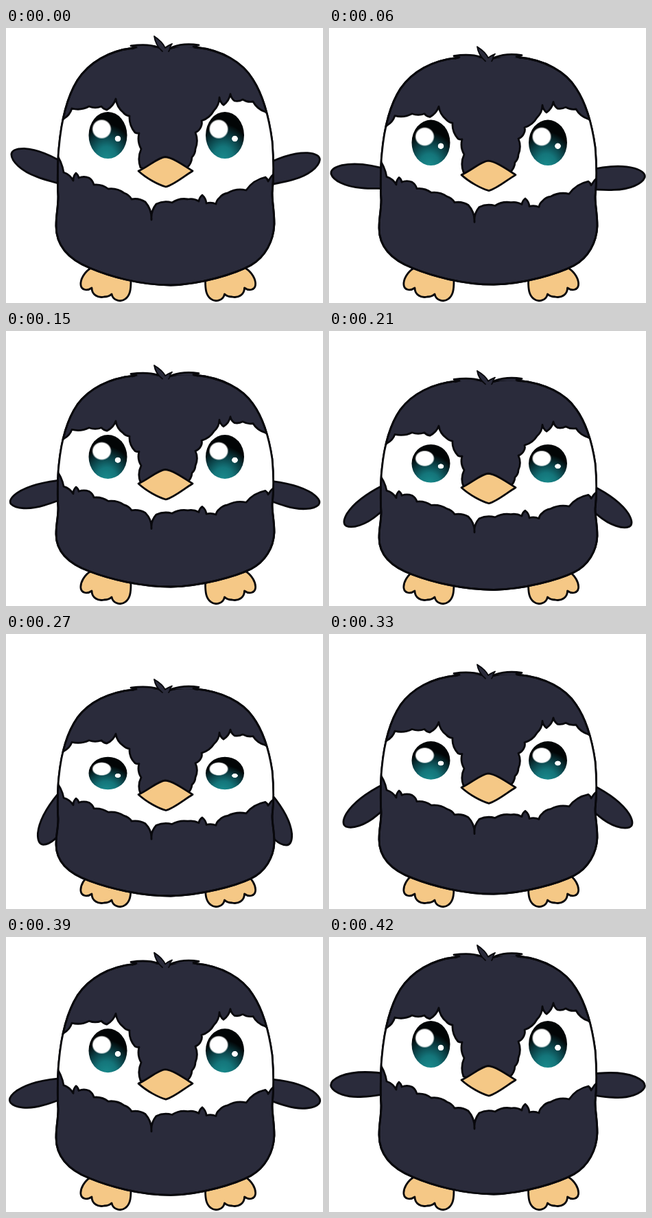
An HTML page that plays this animation: 462 px wide and 400 px high, repeating every 0.45 s.

```html
<!DOCTYPE html>
<html lang="en">
<head>
<meta charset="utf-8">
<title>Flapping penguin</title>
<style>
  html, body { margin: 0; width: 100%; height: 100%; overflow: hidden; background: #fff; }
  svg { display: block; }
  path { stroke: #08080c; stroke-width: 2.8; stroke-linejoin: round; stroke-linecap: round; vector-effect: non-scaling-stroke; }
  .dark { fill: #2a2b3b; }
  .orange { fill: #f5c886; }
  .line { fill: none; }
</style>
</head>
<body>
<svg width="462" height="400" viewBox="0 0 462 400">
  <defs>
    <radialGradient id="iris" cx=".46" cy="1" r=".86">
      <stop offset="0" stop-color="#19898b"/>
      <stop offset=".3" stop-color="#14757a"/>
      <stop offset=".6" stop-color="#0a3c42"/>
      <stop offset=".86" stop-color="#020506"/>
    </radialGradient>
    <radialGradient id="shine">
      <stop offset=".84" stop-color="#fff"/>
      <stop offset="1" stop-color="#fff" stop-opacity="0"/>
    </radialGradient>
    <path id="outline" d="M186 29C150 33 121 50 104 76C88 102 80 140 77 175C75 195 75 230 76 245C76 262 73 270 73 288C73 320 95 338 122 349C150 361 195 374 240 374C285 373 335 357 357 345C378 333 390 310 391 285C391 265 388 255 388 240C390 220 390 190 388 165C384 135 376 100 360 75C345 50 315 32 276 28C260 25 250 26 238 30L222 28C208 25 197 26 186 29Z"/>
    <clipPath id="inside"><use href="#outline"/></clipPath>
    <path id="wing" class="dark" d="M4 -12C-20 -17 -48 -19 -68 -12C-78 -8 -84 -3 -82 3C-78 12 -60 20 -36 19C-20 19 -8 16 4 16Z"/>
    <path id="foot" class="orange" d="M124 349C114 355 108 366 109 374C110 381 118 383 125 378C125 388 134 393 143 391C148 391 152 389 154 387C156 397 168 399 174 394C181 389 182 380 182 368L170 340Z"/>
    <g id="eye">
      <ellipse rx="28" ry="34" fill="url(#iris)"/>
      <circle cx="-9" cy="-9" r="14.5" fill="url(#shine)"/>
      <circle cx="14.5" cy="5" r="4.7" fill="url(#shine)"/>
    </g>
  </defs>

  <use href="#foot"/>
  <use href="#foot" transform="matrix(-1 0 0 1 472.5 0)"/>

  <g id="body">
    <use id="leftWing" href="#wing"/>
    <use id="rightWing" href="#wing"/>
    <use href="#outline" class="dark"/>
    <path id="mask" fill="#fff" clip-path="url(#inside)"/>
    <use href="#outline" class="line"/>
    <path class="dark" d="M222 28C208 23 195 24 182 26L190 28L184 30"/>
    <path class="dark" d="M242 28C255 23 270 23 281 25L273 27L279 29"/>
    <path class="dark" d="M228 34C221 28 217 20 216 12C222 16 229 22 232 29C235 26 238 25 242 23C238 27 240 31 237 34" style="stroke-width:1.8"/>
  </g>

  <use id="leftEye" href="#eye"/>
  <use id="rightEye" href="#eye"/>
  <path id="beak" class="orange" d="M193 208C207 202 222 188 232 187.5C242 188 258 199 272 208C260 215 245 228 233 231C222 228 205 219 193 208Z"/>
</svg>

<script>
const LOOP = 450, STEP = 30;
const place = (id, transform) => document.getElementById(id).setAttribute("transform", transform);

// Closed edge of small scallops that bulge inwards between the given tips
function ragged(text) {
  const tips = text.trim().split(/\s+/).map(s => s.split(",").map(Number));
  return "M" + tips[0] + tips.map(([x, y], i) => {
    const [u, v] = tips[(i + 1) % tips.length];
    return `Q${(x + u) / 2 - (v - y) * .2} ${(y + v) / 2 + (u - x) * .2} ${u} ${v}`;
  }).join("") + "Z";
}

const brow = `60,150 84,132 96,117 121,114 139,114 147,119 160,103 171,123 180,128 188,152 194,153
  197,176 196,203 264,203 271,188 276,176 276,152 284,144 285,135 303,120 311,101 317,112 327,96
  333,106 345,104 360,107 378,122 410,135`;
const chest = `410,200 382,223 378,217 350,236 323,240 311,247 306,256 292,255 286,243 281,252 265,249
  242,254 219,256 212,279 203,253 183,249 172,240 149,234 128,228 121,218 106,218 102,211 98,222
  84,210 60,170`;
document.getElementById("mask").setAttribute("d", ragged(brow + " " + chest));

// Raised, halfway down, crouched, risen again
const poses = [
  { time: 0,   top: 12, height: 362, drop: 0,    eyeY: 156,   eyeSize: 34,   left: 22,  right: 17 },
  { time: 150, top: 50, height: 322, drop: 14,   eyeY: 183,   eyeSize: 32,   left: -17, right: -17 },
  { time: 270, top: 66, height: 315, drop: 25.5, eyeY: 202.5, eyeSize: 23.7, left: -66, right: -66 },
  { time: 420, top: 12, height: 362, drop: 0,    eyeY: 156,   eyeSize: 34,   left: -2,  right: -2 }
];

function poseAt(t) {
  const i = poses.findIndex(p => p.time >= t && p.time > 0), a = poses[i - 1], b = poses[i];
  const k = (t - a.time) / (b.time - a.time);
  return Object.fromEntries(Object.keys(a).map(key => [key, a[key] + (b[key] - a[key]) * k]));
}

function draw(now) {
  const { top, height, drop, eyeY, eyeSize, left, right } = poseAt(Math.floor(now % LOOP / STEP) * STEP);
  const squash = height / 362, open = eyeSize / 34;
  place("body", `matrix(1 0 0 ${squash} 0 ${top - 12 * squash})`);
  place("leftWing", `translate(85 212) rotate(${left})`);
  place("rightWing", `translate(378 213) scale(-1 1) rotate(${right})`);
  place("beak", `translate(0 ${drop})`);
  place("leftEye", `translate(148.5 ${eyeY}) scale(1 ${open})`);
  place("rightEye", `translate(319 ${eyeY}) scale(1 ${open})`);
}

let start;
function tick(now) {
  start ??= now;
  draw(now - start);
  requestAnimationFrame(tick);
}
draw(0);
requestAnimationFrame(tick);
</script>
</body>
</html>
```
